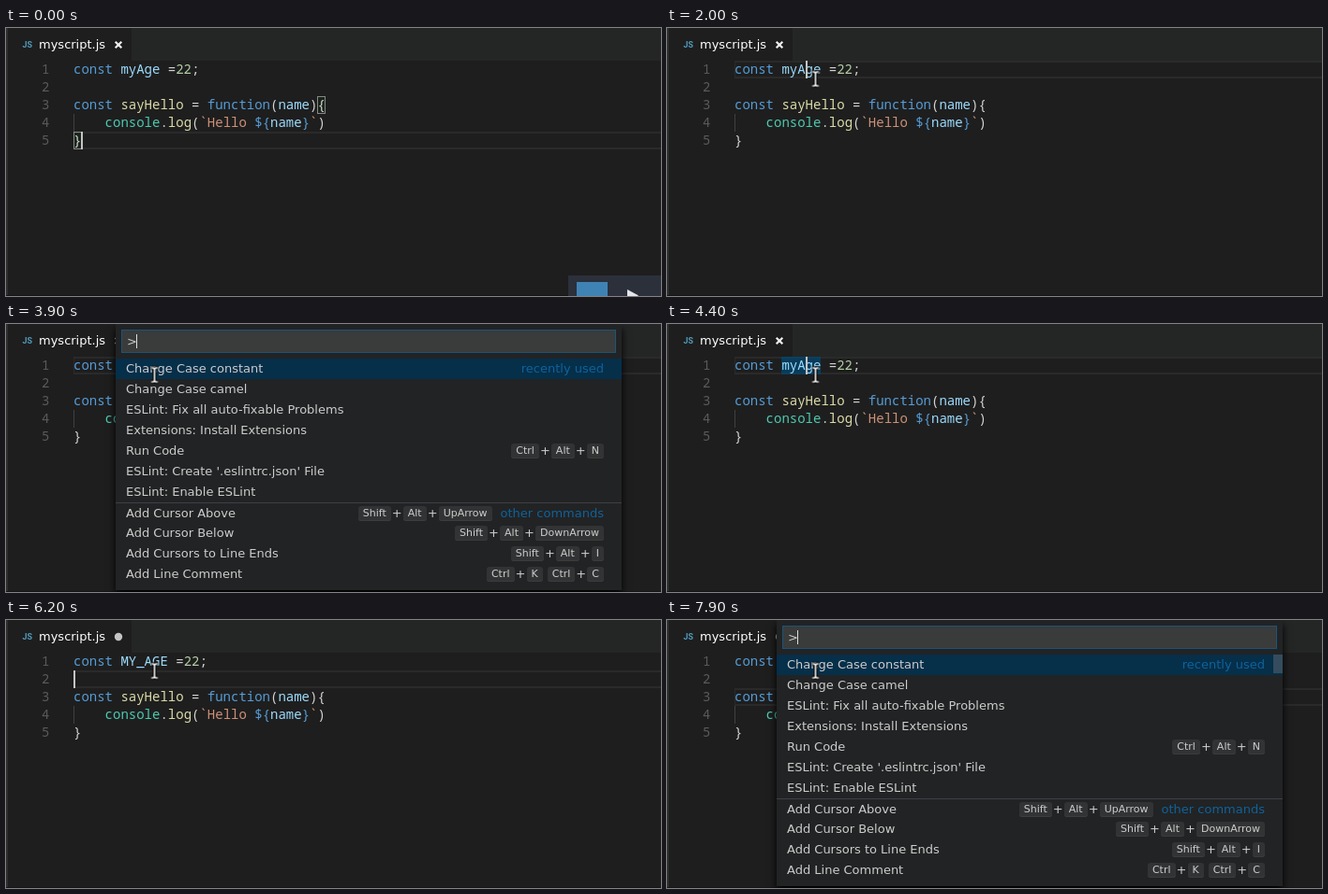
Animation of 699 by 287 pixels, one loop 8000 ms. Source, as an HTML page:

```html
<!DOCTYPE html>
<html lang="en">
<head>
<meta charset="utf-8">
<title>Change case in the editor</title>
<style>
html, body { margin: 0; width: 100%; height: 100%; overflow: hidden; background: #1e1e1e; }
#stage {
  position: relative; width: 699px; height: 287px; overflow: hidden; background: #1e1e1e;
  font: 13px "DejaVu Sans", sans-serif; color: #ccc; white-space: pre;
}
#stage * { box-sizing: border-box; }
.abs { position: absolute; }
/* every moving part shares one 8 s clock */
.t { animation: 8s step-end -10ms infinite; }

/* window frame and tab */
.bar { left: 134px; top: 0; right: 0; height: 35px; background: #242625; }
.edge { left: 0; top: 0; width: 2px; height: 287px; background: #2d2f30; }
.foot { left: 0; bottom: 0; width: 699px; height: 1px; background: #141417; }
.js { left: 17.5px; top: 12px; font: 700 9px/12px Roboto, sans-serif; color: #519aba; }
.title { left: 35px; top: 0; line-height: 35px; color: #fff; }
.mark { left: 114px; top: 12px; width: 12px; height: 12px; }

/* code */
.code, .nums { top: 34px; font: 14px/19px "Noto Sans Mono", monospace; font-variant-ligatures: none; }
.code { left: 72px; color: #d4d4d4; }
.code div { height: 19px; }
.nums { left: 38px; color: #5a5a5a; }
.k { color: #569cd6; } .v { color: #9cdcfe; } .f { color: #dcdcaa; }
.c { color: #4ec9b0; } .s { color: #ce9178; } .n { color: #b5cea8; }
.row { left: 72px; top: 35px; right: 0; height: 19px; border: solid #2a2a2a; border-width: 2px 0 2px 1px; }
.guide { left: 72px; top: 92px; width: 1px; height: 19px; background: #404040; }
.match { width: 9px; height: 19px; border: 1px solid #888; background: rgba(0,100,0,.1); }
.word { left: 122.4px; top: 35px; width: 42px; height: 19px; background: rgba(0,73,114,.72); }
.caret { left: 72px; top: 35px; width: 2px; height: 19px; background: #c4c5c3; }

/* command palette */
.palette { left: 117px; top: 0; width: 540px; height: 285px; background: #222324; box-shadow: 0 5px 8px #000; }
.input { left: 6px; top: 6px; width: 528px; height: 25px; padding-left: 5px; line-height: 23px;
  background: #3a3b3b; border: 1px solid #1b5478; }
.tick { left: 15px; top: 4px; width: 1px; height: 15px; background: #ddd; }
.list { left: 0; top: 37px; width: 540px; }
.item { display: flex; align-items: center; height: 22px; line-height: 22px; padding: 0 19px 0 11px; }
.item:first-child { background: #062f4a; }
.item.split { border-top: 1px solid #3f3f46; }
.item .name { flex: 1; }
.tag { color: #0e639c; margin-left: 9px; }
kbd { font: 11px/13px "DejaVu Sans", sans-serif; height: 16px; padding: 1px 5px; border-radius: 3px;
  background: #323334; box-shadow: inset 0 -1px #3c3c3c; }
.plus { width: 13px; text-align: center; }
.chord { width: 5px; }
.thumb { right: 0; top: 37px; width: 10px; height: 20px; background: rgba(121,121,121,.4); }

/* recorder panel */
.dock { left: 600px; top: 265px; width: 99px; height: 22px; background: #2b303b; }
.dock i { left: 9px; top: 7px; width: 33px; height: 15px; background: #3f83b5; }
.beam { left: -6px; top: -10px; width: 12px; height: 20px; }

.dock { animation-name: dock; }
@keyframes dock { 0% { opacity: 1 } 1.25%, 100% { opacity: 0 } }

.match { animation-name: match; }
@keyframes match { 0% { opacity: 1 } 22.5%, 100% { opacity: 0 } }

.row { animation-name: row; }
@keyframes row {
  0% { transform: translateY(76px) }
  22.5% { transform: none }
  75% { transform: translateY(19px) }
  80%, 100% { transform: translateY(38px) }
}

.word { animation-name: word; }
@keyframes word {
  0% { opacity: 0; width: 42px; transform: none }
  27.5% { opacity: 1; width: 42px; transform: none }
  60% { opacity: 0; width: 50.4px; transform: none }
  62.5% { opacity: 1; width: 50.4px; transform: none }
  75% { opacity: 0; width: 67.2px; transform: translateY(38px) }
  83.75%, 100% { opacity: 1; width: 67.2px; transform: translateY(38px) }
}

.caret { animation-name: place, blink; }
@keyframes place {
  0% { transform: translate(8px, 76px) }
  22.5% { transform: translate(76px, 0) }
  60% { transform: translate(100.8px, 0) }
  75% { transform: translate(0, 19px) }
  80%, 100% { transform: translate(101px, 38px) }
}
@keyframes blink {
  0%, 10%, 22.5%, 52.5%, 60%, 72.5%, 92.5% { opacity: 1 }
  3.75%, 16.25%, 28.75%, 58.75%, 66.25%, 86.25%, 95%, 100% { opacity: 0 }
}

.old { animation-name: old; }
@keyframes old { 0% { opacity: 1 } 60%, 100% { opacity: 0 } }
.new { animation-name: new; }
@keyframes new { 0% { opacity: 0 } 60%, 100% { opacity: 1 } }

.palette { animation-name: palette; }
@keyframes palette {
  0%, 52.5% { visibility: hidden }
  33.75%, 95%, 100% { visibility: visible }
}
.tick { animation-name: tick; }
@keyframes tick { 0%, 46.25%, 95%, 100% { opacity: 1 } 40% { opacity: 0 } }
.thumb { animation-name: thumb; }
@keyframes thumb {
  0% { opacity: 0 }
  37.5% { opacity: 1 }
  41.25% { opacity: 1; animation-timing-function: linear }
  48.75% { opacity: 0 }
  98.75%, 100% { opacity: 1 }
}

.mouse { left: 0; top: 0; animation-name: mouse, show; }
@keyframes mouse {
  0% { transform: translate(334px, 152px) }
  2.5% { transform: translate(334px, 152px); animation-timing-function: ease-in-out }
  7.5% { transform: translate(352px, 169px) }
  8.75% { transform: translate(352px, 169px); animation-timing-function: ease-in-out }
  20%, 100% { transform: translate(158.5px, 54.5px) }
}
@keyframes show { 0% { opacity: 0 } 1.25%, 100% { opacity: 1 } }
</style>
</head>
<body>
<div id="stage">
  <div class="abs bar"></div>
  <div class="abs js">JS</div>
  <div class="abs title">myscript.js</div>
  <svg class="abs mark t old" viewBox="-6 -6 12 12"><path d="M-3.3-3.3 3.3 3.3M3.3-3.3-3.3 3.3" stroke="#eee" stroke-width="2.2"/></svg>
  <svg class="abs mark t new" viewBox="-6 -6 12 12"><circle r="4.2" fill="#c5c5c5"/></svg>

  <div class="abs row t"></div>
  <div class="abs word t"></div>
  <div class="abs guide"></div>
  <div class="abs match t" style="left:332px;top:73px"></div>
  <div class="abs match t" style="left:72px;top:111px"></div>
  <div class="abs nums">1
2
3
4
5</div>
  <div class="abs code"><div><span class="abs t old"><span class="k">const</span> <span class="v">myAge</span> =<span class="n">22</span>;</span><span class="abs t new"><span class="k">const</span> <span class="v">MY_AGE</span> =<span class="n">22</span>;</span></div><div></div><div><span class="k">const</span> <span class="f">sayHello</span> = <span class="k">function</span>(<span class="v">name</span>){</div><div>    <span class="c">console</span>.<span class="f">log</span>(<span class="s">`Hello </span><span class="k">${</span><span class="v">name</span><span class="k">}</span><span class="s">`</span>)</div><div>}</div></div>
  <div class="abs caret t"></div>
  <div class="abs edge"></div>
  <div class="abs foot"></div>

  <div class="abs palette t">
    <div class="abs input">&gt;<div class="abs tick t"></div></div>
    <div class="abs list" id="list"></div>
    <div class="abs thumb t"></div>
  </div>

  <div class="abs dock t"><i class="abs"></i><svg class="abs" width="99" height="22"><path d="M63 15 75 21.5 63 28z" fill="#e4e6ea"/></svg></div>
  <div class="abs mouse t"><svg class="abs beam" viewBox="-6 -10 12 20" fill="none">
    <path id="ib" d="M-3.5-7.5H-1.5L0-6.5 1.5-7.5H3.5M0-6.5V6.5M-3.5 7.5H-1.5L0 6.5 1.5 7.5H3.5" stroke="#000" stroke-width="3.6"/>
    <use href="#ib" style="stroke:#fff"/>
    <path d="M-3.5-7.5H-1.5L0-6.5 1.5-7.5H3.5M0-6.5V6.5M-3.5 7.5H-1.5L0 6.5 1.5 7.5H3.5" stroke="#fff" stroke-width="1.6"/>
  </svg></div>
</div>
<script>
// name, shortcut (space between chords), group label
const items = [
  ["Change Case constant", "", "recently used"],
  ["Change Case camel"],
  ["ESLint: Fix all auto-fixable Problems"],
  ["Extensions: Install Extensions"],
  ["Run Code", "Ctrl+Alt+N"],
  ["ESLint: Create '.eslintrc.json' File"],
  ["ESLint: Enable ESLint"],
  ["Add Cursor Above", "Shift+Alt+UpArrow", "other commands"],
  ["Add Cursor Below", "Shift+Alt+DownArrow"],
  ["Add Cursors to Line Ends", "Shift+Alt+I"],
  ["Add Line Comment", "Ctrl+K Ctrl+C"]
];
const chord = c => c.split("+").map(k => `<kbd>${k}</kbd>`).join('<span class="plus">+</span>');
const keys = s => s ? s.split(" ").map(chord).join('<span class="chord"></span>') : "";
document.getElementById("list").innerHTML = items.map(([name, key, tag], i) =>
  `<div class="item${i && tag ? " split" : ""}"><span class="name">${name}</span>${keys(key)}` +
  (tag ? `<span class="tag">${tag}</span>` : "") + "</div>").join("");
</script>
</body>
</html>
```
